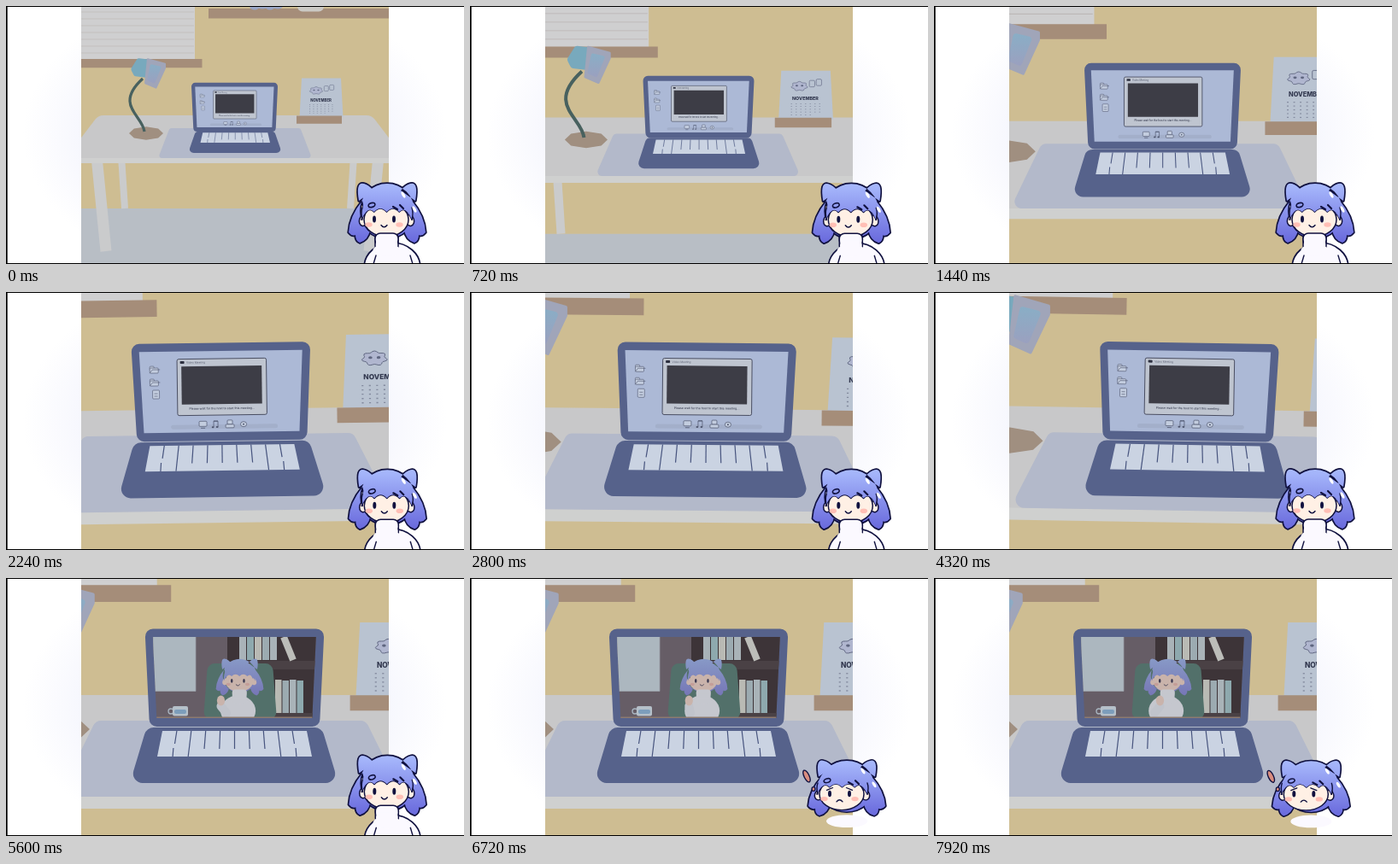
Recreate the animation shown at these times as an HTML page with a canvas. Size 536 px wide and 302 px high, loop 8000 ms.

```html
<!DOCTYPE html>
<html lang="en">
<head>
<meta charset="utf-8">
<title>Desk call</title>
<style>
html, body { margin: 0; width: 536px; height: 302px; overflow: hidden; background: #fff; }
canvas { display: block; width: 536px; height: 302px; }
</style>
</head>
<body>
<canvas id="stage"></canvas>
<script>
const W = 536, H = 302, LOOP = 8000, STEP = 80, TAU = Math.PI * 2;
const ZOOM_TIME = 2120, CALL_AT = 4960, SAD_AT = 6080, WAVE = 928;
const PAN = [[0, 0], [1440, 0], [2240, -15], [3280, 28], [4320, 30], [5440, 0]];
const SIDES = [-1, 1];
const NAVY = '#56628b', DARK = '#4d546d', PALE = '#c3cddf', WOOD = '#a58d79';
const VIVID = { top: '#a6b7fb', tip: '#6868dc', skin: '#fff0e5', blush: '#ffbfb5', knit: '#fbf9ff', ink: '#10113f' };
const DIM = { top: '#8798c6', tip: '#7676b6', skin: '#c9b3ab', blush: '#c49d98', knit: '#c5c7ce', ink: '#3a3850', flat: true };

const canvas = document.getElementById('stage');
const dpr = window.devicePixelRatio || 1;
canvas.width = W * dpr;
canvas.height = H * dpr;
const c = canvas.getContext('2d');

const mix = (a, b, k) => a + (b - a) * k;
const ease = v => { v = Math.max(0, Math.min(1, v)); return v * v * (3 - 2 * v); };

function keyed(keys, t) {
  for (let i = 1; i < keys.length; i++) {
    const [t0, v0] = keys[i - 1], [t1, v1] = keys[i];
    if (t < t1) return mix(v0, v1, ease((t - t0) / (t1 - t0)));
  }
  return keys[keys.length - 1][1];
}

function paint(fill, stroke, lw = 1) {
  if (fill) { c.fillStyle = fill; c.fill(); }
  if (stroke) { c.strokeStyle = stroke; c.lineWidth = lw; c.stroke(); }
}

// Polygon from [x, y] points, corners rounded by r
function poly(pts, fill, r = 0) {
  const n = pts.length, last = pts[n - 1];
  c.beginPath();
  c.moveTo((pts[0][0] + last[0]) / 2, (pts[0][1] + last[1]) / 2);
  pts.forEach((p, i) => c.arcTo(...p, ...pts[(i + 1) % n], r));
  c.closePath();
  paint(fill);
}

// Symmetric trapezoid: width w0 at y0, width w1 at y1
function trap(x, y0, w0, y1, w1, fill, r) {
  poly([[x - w0 / 2, y0], [x + w0 / 2, y0], [x + w1 / 2, y1], [x - w1 / 2, y1]], fill, r);
}

// Closed shape whose radius is scaled by wobble(angle)
function ring(x, y, rx, ry, n, wobble, fill, stroke, lw) {
  c.beginPath();
  for (let i = 0; i < n; i++) {
    const a = i / n * TAU, k = wobble(a);
    c.lineTo(x + rx * k * Math.cos(a), y + ry * k * Math.sin(a));
  }
  c.closePath();
  paint(fill, stroke, lw);
}

function line(x0, y0, x1, y1, color, lw) {
  c.beginPath();
  c.moveTo(x0, y0);
  c.lineTo(x1, y1);
  paint(null, color, lw);
}

function curve(x0, y0, cx, cy, x1, y1, color, lw) {
  c.beginPath();
  c.moveTo(x0, y0);
  c.quadraticCurveTo(cx, cy, x1, y1);
  paint(null, color, lw);
}

function oval(x, y, rx, ry, fill, stroke, lw, rot = 0) {
  c.beginPath();
  c.ellipse(x, y, rx, ry, rot, 0, TAU);
  paint(fill, stroke, lw);
}

function box(x, y, w, h, fill, r = 0, stroke, lw) {
  c.beginPath();
  c.roundRect(x, y, w, h, r);
  paint(fill, stroke, lw);
}

function text(s, x, y, font, color, align = 'left') {
  c.font = font + ' Inter, "Open Sans", sans-serif';
  c.textAlign = align;
  c.fillStyle = color;
  c.fillText(s, x, y);
}

function layer(draw, sx, sy, tx, ty) {
  c.save();
  c.transform(sx, 0, 0, sy, tx, ty);
  draw();
  c.restore();
}

function fade(y0, y1, from, to) {
  const g = c.createLinearGradient(0, y0, 0, y1);
  g.addColorStop(0, from);
  g.addColorStop(1, to);
  return g;
}

function wall() {
  box(-200, 237, 900, 200, '#b8bec5');
  box(60, -30, 161, 94, '#cfcfd0');
  for (let y = 7; y < 62; y += 8) line(60, y, 220, y, '#bdb9b7', .7);
  box(20, 62, 209.5, 10.2, WOOD);
  box(237, 3, 260, 11.5, WOOD);
  for (let i = 0; i < 4; i++) oval(291 + i * 9, 0, 6, 4.5 - i % 2, '#9aa6c6');
  box(341, -12, 31, 18.5, '#cbc9c4', 6);
  for (const s of SIDES) {
    line(271 + s * 136, 176, 271 + s * 132, 237, '#cacbcc', 8);
    line(271 + s * 165, 176, 271 + s * 154, 287, '#cacbcc', 13);
  }
}

function lamp() {
  ring(164, 149, 20, 7.8, 8, () => 1, '#a08f80');
  c.beginPath();
  c.moveTo(162, 147);
  c.bezierCurveTo(160, 128, 126, 116, 160, 85);
  paint(null, '#48615f', 3.2);
  poly([[146, 74], [154, 61], [170, 63], [166, 84], [150, 82]], '#78a9bd', 3);
  poly([[165, 61], [187, 67], [187, 73], [176, 97], [162, 91]], '#a0a5b9', 1);
  poly([[169, 68], [182, 71], [174, 91], [165, 87]], fade(68, 91, '#89aec6', '#9ba0bf'), 2);
}

function calendar() {
  const pen = '#5f6680';
  trap(369, 84.5, 46, 130, 51, '#b9c3d1');
  box(340, 128.5, 53, 9.2, WOOD);
  ring(363, 99, 7, 4, 40, a => 1 + .12 * Math.sin(a * 7), '#b0b6cf', pen, .5);
  for (const s of SIDES) {
    oval(363 + s * 2.5, 98.5, 1.2, .8, pen);
    box(375.5 + s * 3.2, 93 - s * .6, 5, 6, null, 1, pen, .5);
  }
  text('NOVEMBER', 368.5, 111.6, '800 4.3px', '#31374e', 'center');
  for (let i = 0; i < 33; i++) {
    box(355 + i % 7 * 4.4, 115 + Math.floor(i / 7) * 2.6, 1.1, .7, '#838a9e');
  }
}

function desk(q) {
  const k = (a, b) => mix(a, b, q);
  trap(268, k(128, 137), k(320, 616), k(182, 260), k(402, 830), '#c8c8c9', 12);
  const edge = k(178, 256), span = k(398, 830);
  box(268 - span / 2, edge, span, k(6, 14), '#cfd0cf');
  trap(k(268, 263), k(143, 167), k(153, 316), edge, k(180, 404), '#b3b9ca', k(3, 10));
}

function base() {
  trap(267, 175, 205, 240, 244, NAVY, 11);
  trap(267.5, 179, 169, 209, 181, '#cad3e2');
  for (let i = 1; i < 10; i++) {
    const d = i - 5, top = 267.5 + d * 16.9, slope = d * 1.2;
    const edge = Math.abs(d) === 4, end = Math.abs(d) === 3 ? 1 : edge ? .5 : .7;
    line(top, 179, top + slope * end, 179 + 30 * end, '#47547e', 1.2);
    if (edge) line(top + d, 199, top + d * 1.2, 209, '#47547e', 1.2);
  }
}

function icons() {
  for (const y of [90, 105]) {
    box(184, y - 4, 5, 4, PALE, 1, DARK, .6);
    box(184, y - 2, 10, 6, PALE, 1, DARK, .6);
    line(184, y + 4, 187, y, DARK, .6);
    line(187, y, 196, y, DARK, .6);
  }
  box(187, 114, 8, 10, PALE, 1, DARK, .6);
  for (const y of [118, 121]) line(189, y, 193, y, DARK, .6);

  box(208, 155, 125, 5, '#a3afca', 2.5);
  box(241, 151, 9, 6, PALE, 1, DARK, .7);
  line(243, 159, 248, 159, DARK, .8);
  for (const x of [258, 263]) {
    line(x, 151, x, 158, DARK, .7);
    oval(x - 1, 158, 1.4, 1, DARK);
  }
  line(258, 151, 263, 151, DARK, 1.2);
  box(274, 150, 6, 5, PALE, 1, DARK, .7);
  box(272, 155, 10, 4, PALE, 1, DARK, .7);
  oval(293, 155, 3.6, 3, PALE, DARK, .7);
  oval(293, 155, 1, .9, DARK);
}

const screen = fill => trap(267.3, 69, 191, 164, 182, fill);

function desktop() {
  screen('#acb9d6');
  icons();
  box(216, 78, 104.5, 66, '#bfc5d0', 2, '#3e4256', .9);
  box(219.5, 80.4, 5, 3, '#2d3040', .8);
  text('Video Meeting', 227, 83.3, '3.2px', '#5c6274');
  box(221, 86.5, 94, 44.5, '#3d3d46');
  text('Please wait for the host to start this meeting...', 268, 137.3, '500 3.5px', '#3c4154', 'center');
}

function bookshelf() {
  const spines = ['#a9b3b8', '#8ea9ae', '#b9bab4', '#9cabb1'];
  box(259, 66, 110, 100, '#3d3438');
  box(265, 97, 100, 10, '#4a4145');
  for (let i = 0; i < 5; i++) box(273 + i * 9, 69, 8, 27, spines[i % 4]);
  line(325, 69, 336, 96, '#bcbdb9', 8);
  for (let i = 0; i < 4; i++) box(315 + i * 8.5, 119 + i % 2, 7.5, 39, spines[(i + 2) % 4]);
  box(308, 158, 60, 5, '#4a4145');
}

function call(t) {
  c.save();
  screen('#665d66');
  c.clip();
  box(172, 66, 50, 66.5, '#acb7bf', 0, '#9aa0a8', .8);
  bookshelf();
  trap(274, 100, 76, 166, 86, '#52706a', 9);
  layer(() => girl(DIM, { body: -9 }), .62, .62, -3, -34.3);
  const x = 258 - 6.5 * Math.cos((t - 5600) / WAVE * TAU);
  c.lineCap = 'round';
  line(258, 158, x, 150, '#c0c3cb', 10);
  c.lineCap = 'butt';
  oval(x, 143.5, 4.6, 6, DIM.skin);
  oval(193, 156, 3, 3, null, '#a9b5c0', 1.3);
  box(195, 150, 18, 11.5, '#b5c0c9', 2);
  box(197, 154, 14, 5, '#7c9dbb', 2);
  box(170, 162.5, 200, 3, '#8d7b70');
  c.restore();
}

function lid(t) {
  trap(267.5, 59.5, 210, 174, 199, NAVY, 9);
  if (t < CALL_AT) desktop(); else call(t);
}

function room(t) {
  const q = ease(t / ZOOM_TIME), p = 1 - q, pan = keyed(PAN, t);
  c.save();
  c.beginPath();
  c.rect(88, 0, 360, H);
  c.clip();
  c.fillStyle = '#cebd92';
  c.fillRect(88, 0, 360, H);
  c.translate(268 + pan, 150);
  c.rotate(.0175 * Math.tanh(pan / 15));
  c.translate(-268, -150);
  const s = 1 + .94 * q, ty = -112 * q;
  layer(wall, s, s, -252 * q, ty);
  desk(q);
  layer(calendar, s, s, -257 * q, ty);
  layer(lamp, s, s, -259 * q, ty);
  layer(base, mix(.45, 1, q), mix(.39, 1, q), 147.9 * p, 78.4 * p);
  layer(() => lid(t), mix(.483, 1, q), mix(.5, 1, q), 138.3 * p, 60 * p);
  c.restore();
}

// Dome, flared side locks and ear tufts, outlined as one silhouette
function hairBack(look, fill) {
  const shape = new Path2D();
  shape.ellipse(446, 240, 32, 32, 0, 0, TAU);
  for (const s of SIDES) {
    const x = d => 446 + s * d;
    const part = new Path2D();
    part.moveTo(x(29), 228);
    part.quadraticCurveTo(x(44), 246, x(45), 265);
    part.quadraticCurveTo(x(41), 270, x(37), 268);
    part.quadraticCurveTo(x(37), 275, x(32), 277);
    part.quadraticCurveTo(x(22), 274, x(20), 262);
    part.closePath();
    part.moveTo(x(33), 228);
    part.quadraticCurveTo(x(37), 205, x(27), 208);
    part.quadraticCurveTo(x(22), 209, x(16), 216);
    part.closePath();
    shape.addPath(part);
  }
  if (!look.flat) {
    c.strokeStyle = look.ink;
    c.lineWidth = 3.4;
    c.stroke(shape);
  }
  c.fillStyle = fill;
  c.fill(shape);
}

function bangs(look, fill, edge) {
  const x0 = 416, lock = 14.75, tip = i => 241 + (i % 4 ? 0 : 9);
  c.beginPath();
  c.moveTo(x0, tip(0));
  for (let i = 1; i <= 4; i++) c.quadraticCurveTo(x0 + lock * (i - .5), 233, x0 + lock * i, tip(i));
  if (edge) paint(null, edge, 1.7);
  c.bezierCurveTo(478, 200, 414, 200, x0, tip(0));
  paint(fill);
}

function face(look, sad, fill) {
  const edge = look.flat ? null : look.ink;
  for (const s of SIDES) oval(445.5 + s * 27, 251, 5, 6.5, look.skin, edge, 1.5, -s * .3);
  oval(445, 250, 26, 20, look.skin, edge, 1.5);
  bangs(look, fill, edge);
  for (const s of SIDES) {
    oval(442.5 + s * 18, 256, 4.2, 2.8, look.blush);
    oval(442.5 + s * 11.5, 249.5, 2, 4, look.ink);
    if (sad) line(442.5 + s * 8, 242, 442.5 + s * 15, 245, look.ink, 1.3);
  }
  const bend = sad ? -3 : 3;
  curve(439, 258 - bend / 2, 442.5, 258 + bend, 446, 258 - bend / 2, look.ink, 1.4);
  if (look.flat) return;
  for (let i = 0; i < 2; i++) line(453 + i * 8, 235 - i * 2, 458 + i * 7, 238 - i, look.ink, 2.2);
  oval(428, 233, 4, 2.5, null, look.ink, 1.6, -.3);
  for (const s of SIDES) curve(446 + s * 29, 236, 446 + s * 31, 242, 446 + s * 29, 250, look.ink, 1.4);
}

function sweater(look, dx) {
  const edge = look.flat ? null : look.ink;
  oval(452 + dx, 306, 33, 29, look.knit, edge, 1.7);
  box(432, 265, 27, 22, look.knit, 6, edge, 1.5);
  oval(445.5, 286, 16, 7, look.knit);
  if (edge) for (const s of SIDES) line(453 + s * 20, 292, 453 + s * 23, 302, edge, 1.4);
}

function girl(look, { sad = false, body = 0 } = {}) {
  const fill = fade(210, 278, look.top, look.tip);
  c.lineCap = c.lineJoin = 'round';
  hairBack(look, fill);
  if (!sad) sweater(look, body);
  c.save();
  if (sad) c.translate(-5, 0);
  face(look, sad, fill);
  c.restore();
  if (sad) oval(446, 284, 24, 8, look.knit);
  else box(432, 266, 27, 14, look.knit, 6, look.flat ? null : look.ink, 1.5);
  if (!sad) box(433, 274, 25, 9, look.knit);
  if (!look.flat) for (let i = 0; i < 2; i++) oval(465 + i * 13, 221 + i * 17, 1.7, 4, '#fff', null, 1, -.5);
}

function avatar(t) {
  const jitter = Math.floor(t / 240) % 2 * .3;
  c.save();
  c.translate(jitter, jitter);
  if (t < SAD_AT) {
    girl(VIVID);
  } else {
    layer(() => girl(VIVID, { sad: true }), 1, .93, -5, 20.5);
    oval(394, 232, 3, 7.5, '#d98d7f', VIVID.ink, 1.4, -.45);
    oval(402, 247, 2, 2.4, '#d98d7f', VIVID.ink, 1.3);
  }
  c.restore();
}

function backdrop() {
  c.fillStyle = '#fff';
  c.fillRect(0, 0, W, H);
  const g = c.createRadialGradient(0, 0, 150, 0, 0, 248);
  g.addColorStop(0, '#f3f4fd');
  g.addColorStop(1, '#ffffff');
  layer(() => oval(0, 0, 248, 248, g), 1, .68, 268, 150);
}

function frame(now) {
  const t = Math.floor((now % LOOP) / STEP) * STEP;
  c.setTransform(dpr, 0, 0, dpr, 0, 0);
  c.lineCap = 'butt';
  backdrop();
  room(t);
  avatar(t);
  box(0, 0, 1.7, H, '#000');
  for (const y of [0, H - 1]) box(0, y, W, 1, '#000');
}

let start = null;
function tick(now) {
  if (start === null) start = now;
  frame(now - start);
  requestAnimationFrame(tick);
}
frame(0);
requestAnimationFrame(tick);
</script>
</body>
</html>
```
